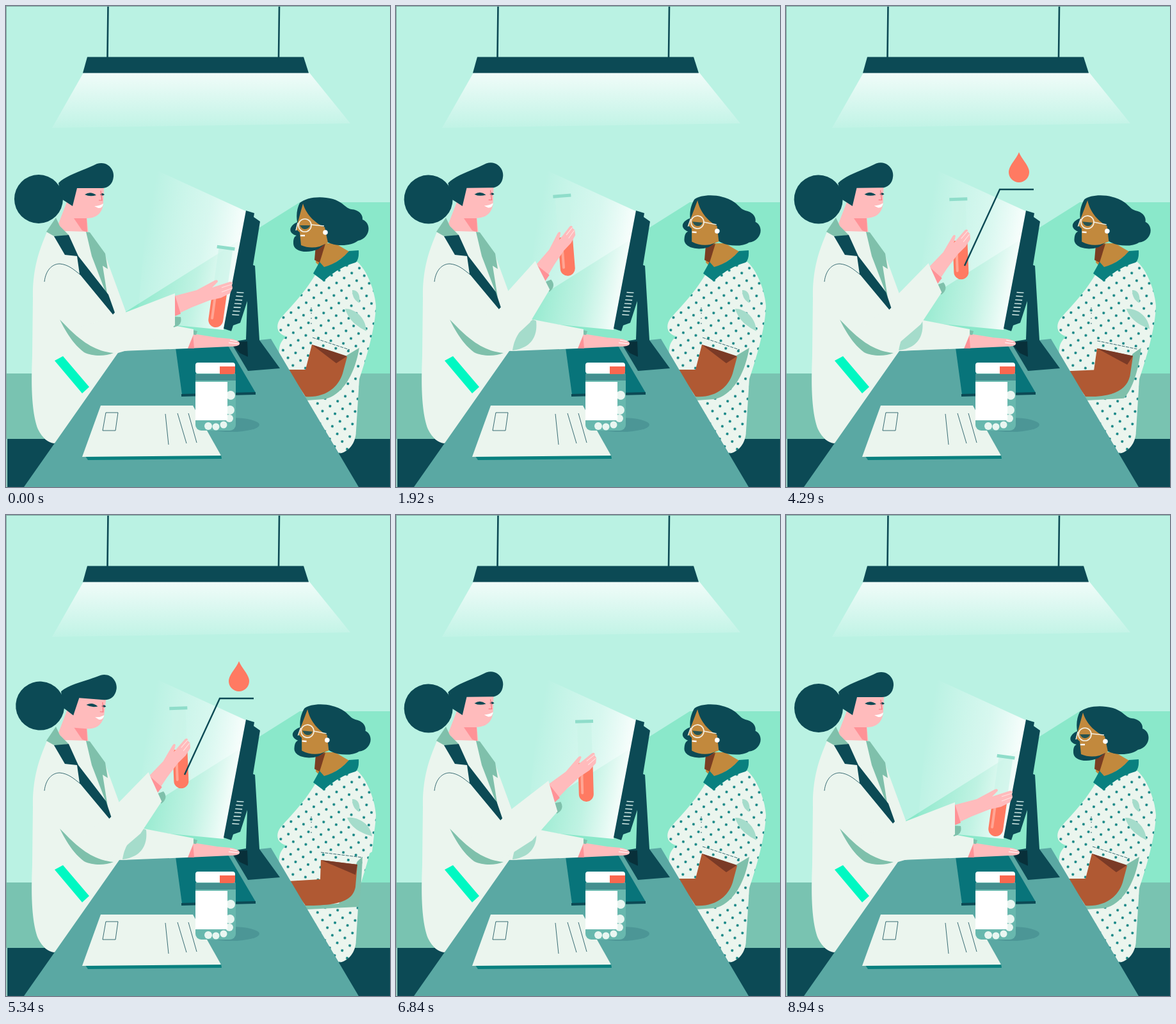
Write an HTML page that moves like this. It is 600 by 750 pixels and loops after 9030 ms.

```html
<!DOCTYPE html>
<html lang="en">
<head>
<meta charset="utf-8">
<title>At the pharmacy desk</title>
<style>
html, body { margin: 0; height: 100%; overflow: hidden; background: #baf2e3; }
svg { display: block; width: 600px; height: 750px; }
.dark { fill: #0c4a55; }
.teal { fill: #09807f; }
.cream { fill: #ebf5ee; }
.shade { fill: #7fc0ab; }
.mint { fill: #a5dccb; }
.skin { fill: #ffbbbc; }
.blush { fill: #ff9297; }
.red { fill: #ff7a62; }
.brown { fill: #c2893d; }
.white { fill: #fff; }
.thin { fill: none; stroke: #0c4a55; stroke-width: .8; }
</style>
</head>
<body>
<svg viewBox="0 0 600 750">
  <defs>
    <linearGradient id="lamp" x2="0" y2="1">
      <stop stop-color="#f1fcf9"/><stop offset="1" stop-color="#f1fcf9" stop-opacity=".12"/>
    </linearGradient>
    <linearGradient id="beam" gradientUnits="userSpaceOnUse" x1="212" y1="375" x2="364" y2="405">
      <stop stop-color="#fff" stop-opacity="0"/><stop offset=".6" stop-color="#f4fdfb" stop-opacity=".5"/>
      <stop offset="1" stop-color="#fff" stop-opacity=".95"/>
    </linearGradient>
    <pattern id="dots" width="20" height="20" patternUnits="userSpaceOnUse" patternTransform="rotate(12)">
      <rect width="20" height="20" class="cream"/>
      <circle cx="5" cy="5" r="2" class="teal"/><circle cx="15" cy="15" r="2" class="teal"/>
    </pattern>
    <clipPath id="aboveLine"><path d="M330 200H400V285H330Z"/></clipPath>
  </defs>

  <!-- Room -->
  <rect width="600" height="750" fill="#baf2e3"/>
  <path d="M459 306H600V573H41V567L190 475Z" fill="#8ae8ca"/>
  <rect y="573" width="600" height="102" fill="#79c3b1"/>
  <rect x="2" y="675" width="598" height="75" class="dark"/>
  <path d="M159.5 0L158.5 80M427 0L426 80" stroke="#0c4a55" stroke-width="2.6"/>
  <path d="M121 104H474L538 183L72 190Z" fill="url(#lamp)"/>
  <path d="M127 79.5H465L473 104.5H120Z" class="dark"/>
  <path d="M226 252L375 320L340 505L205 492Z" fill="url(#beam)"/>

  <!-- Patient -->
  <path d="M487 412C470 445 440 474 429 487C420 499 424 512 438 515C430 522 425 530 427 546L520 698C535 696 547 682 547 662L552 582C560 558 577 505 578 468C577 448 566 414 549 399Z" fill="url(#dots)"/>
  <path d="M541 443C550 442 554 452 552 463C544 459 541 452 541 443Z" class="mint"/>
  <path id="sleeve" fill="url(#dots)"/>
  <path id="fold" class="mint"/>
  <path id="elbow" class="shade"/>
  <path id="forearm" fill="#b05933"/>
  <path id="inside" fill="#7a3a26"/>
  <path id="hem" class="thin" stroke-dasharray="5 1.5"/>
  <path d="M486 370H514L538 384L497 412L484 400Z" class="brown"/>
  <path d="M484 373L499 371L490 400L482 396Z" fill="#7a3d22"/>
  <path d="M490 399L497 407Q520 401 536 382L551 381Q552 396 546 400Q520 407 496 429L480 417Z" class="teal"/>
  <path d="M477 470v32" class="thin" stroke-dasharray="2 6"/>
  <g id="patientHead">
    <path d="M459 307C470 297 502 294 522 306C530 311 533 316 540 317C552 318 558 326 557 333C572 339 569 362 550 366C540 374 517 376 502 368L488 379C470 387 448 383 449 369C449 362 451 359 454 358C440 354 442 343 455 337C453 325 455 315 459 307Z" class="dark"/>
    <path d="M464 308L453 348L459 353L461 373Q475 379 490 375L503 369L498 345C486 340 470 328 464 308Z" class="brown"/>
    <path d="M459 342h16a8 8 0 0 1-13 4Z" class="dark" opacity=".85"/>
    <path d="M460 358L467 358" stroke="#fff" stroke-width="2.4"/>
    <circle cx="467" cy="342" r="10" fill="none" stroke="#f3efe2" stroke-width="1.7"/>
    <path d="M477 341L497 343M456 338L453 350" stroke="#f3efe2" stroke-width="1.4"/>
    <circle cx="499" cy="353" r="3.8" class="white"/>
  </g>

  <!-- Doctor's coat -->
  <path d="M96 303L81 342L100 362L129 358L126 328Z" class="skin"/>
  <path d="M106 331H126L127 353L119 350Z" class="blush"/>
  <path d="M64 352C55 374 41 405 42 455L41 545C39 590 40 635 50 660C57 674 66 681 75 682L95 675L190 537L187 476L154 386L128 352L96 351Z" class="cream"/>

  <!-- Desk -->
  <path d="M177 538L290 532L414 519L551 750H28Z" fill="#5aa8a3"/>
  <path d="M265 533L347 530L390 603L275 606Z" fill="#08747a"/>
  <path d="M274 607L390 604" stroke="#0c4a55" stroke-width="4"/>
  <path d="M375 319L388 323L387 329L397 336L386 404L389 405L396 521L428 565L378 569L351 524L375 520L377 460L366 494L355 498L352 507L340 503Z" class="dark"/>
  <path d="M351 524L377 523L378 547L365 541Z" fill="#08303a"/>
  <path id="vents" stroke="#e4f7f2" stroke-width="1.4"/>
  <path d="M124 702L336 700L337 706L128 708Z" class="teal"/>
  <path d="M148 623H292L336 701L119 703Z" class="cream"/>
  <path d="M156 634H175L171 662H151ZM249 636L254 684M268 635L282 682M285 635L298 681" class="thin"/>
  <ellipse cx="352" cy="653" rx="44" ry="11" fill="#4c9696"/>
  <rect x="296" y="568" width="63" height="94" rx="9" fill="#68b8ae"/>
  <path d="M296 574H359V584H296Z" fill="#438f8f"/>
  <g id="pills" fill="#e9f6f1"></g>
  <rect x="296" y="586" width="50" height="60" class="white"/>
  <rect x="296" y="556" width="62" height="17" rx="4" class="white"/>
  <path d="M334 562H358V570Q358 574 354 574H334Z" fill="#f9674f"/>

  <!-- Doctor's arms -->
  <g id="typing">
    <path d="M284 534L292 511L330 517L352 519Q366 522 365 527Q364 531 350 531Z" class="skin"/>
    <path d="M284 534L292 511L294 534Z" class="blush"/>
    <path d="M350 521L361 523M348 525L364 527" stroke="#fff" stroke-width="1.2"/>
    <path d="M288 504L299 507L297 513L290 512Z" class="shade"/>
    <path d="M150 480L215 489L293 504V512L284 534L180 538Z" class="cream"/>
    <path d="M182 537C185 515 198 498 214 489L219 491C222 518 208 534 182 537Z" class="mint"/>
  </g>
  <g id="arm">
    <path d="M258 484L273 485Q276 498 262 501Z" class="shade"/>
    <g id="hand">
      <g id="tube">
        <path d="M-11-62H11V52A11 11 0 0 1-11 52Z" fill="#c9f4e8" opacity=".65"/>
        <path d="M-11.5 3H11.5V52A11.5 11.5 0 0 1-11.5 52Z" class="red"/>
        <path d="M-6 20V50" stroke="#ffa695" stroke-width="4" stroke-linecap="round"/>
        <path d="M-14-64H14V-59H-14Z" fill="#8fddca"/>
      </g>
      <path d="M260 453L298 443L326 428Q331 426 331 430L322 439L350 430Q356 430 353 435L354 440L350 448L336 455L318 459L290 470L260 484Z" class="skin"/>
      <path d="M260 452L264 451L273 480L260 485Z" class="blush"/>
      <path d="M337 439L353 434M337 446L353 440" stroke="#ffe3e2" stroke-width="1.2"/>
    </g>
    <path d="M160 488L264 448V498L213 530L175 541Q150 546 135 541L115 500Z" class="cream"/>
  </g>
  <path d="M84 489C105 510 130 538 168 541C154 547 134 546 122 540C106 528 95 511 84 489Z" class="shade"/>
  <path d="M76 553L89 546L130 594L119 604Z" fill="#00f8c2"/>
  <path d="M60 430C62 412 72 402 84 402C97 403 106 411 116 419" class="thin"/>
  <path d="M78 330L63 352L77 360L98 357L84 343Z" class="shade"/>
  <path d="M125 352L131 353L155 386L159 410L151 405L159 455L134 390Z" class="shade"/>
  <path id="lapel" class="dark"/>

  <g id="head">
    <circle cx="51" cy="301" r="38" class="dark"/>
    <path d="M107 283H153L152 305C152 320 144 331 126 331H104L100 306Z" class="skin"/>
    <path d="M82 276C95 263 120 257 142 246C158 241 169 254 168 266C167 278 159 284 150 284H111L104 312L87 301Z" class="dark"/>
    <path d="M123 294Q132 288 141 295Q131 298 123 294ZM147 294Q150 290 154 294Q150 297 147 294Z" class="dark"/>
    <path d="M148 288L150 303H145" fill="none" stroke="#f9767f" stroke-width="1.2"/>
    <path d="M138 312Q146 312 152 308Q151 316 144 315Z" class="white"/>
  </g>

  <!-- Callout -->
  <path id="line" d="M279 405L334 286H387" fill="none" stroke="#0c4a55" stroke-width="2.4" pathLength="1" stroke-dasharray="1 2"/>
  <g clip-path="url(#aboveLine)">
    <path id="drop" class="red" d="M364 228C369 240 380 249 380 259A16 16 0 0 1 348 259C348 249 359 240 364 228Z"/>
  </g>
  <path d="M0 .5H600M.5 0V750" stroke="#7da89f"/>
</svg>
<script>
const LOOP = 9030;
const $ = id => document.getElementById(id);
const set = (id, name, value) => $(id).setAttribute(name, value);
const move = (id, value) => set(id, 'transform', value);

// Eased value between [time, value] keys
function key(t, ...keys) {
  if (t <= keys[0][0]) return keys[0][1];
  for (let i = 1; i < keys.length; i++) {
    const [t0, a] = keys[i - 1], [t1, b] = keys[i];
    if (t <= t1) return a + (b - a) * (1 - Math.cos(Math.PI * (t - t0) / (t1 - t0))) / 2;
  }
  return keys[keys.length - 1][1];
}

// Blend two paths with the same commands
function blend(id, from, to, k) {
  const end = to.match(/[\d.]+/g);
  let i = 0;
  set(id, 'd', from.replace(/[\d.]+/g, n => +n + (end[i++] - n) * k));
}

set('vents', 'd', Array.from({length: 7}, (_, i) => `M${360.5 - i * 1.2} ${446.5 + i * 5.8}l11 .6`).join(''));
$('pills').innerHTML = [[351, 607, 7], [350, 630, 7], [349, 643, 6], [340, 653, 5.5], [328, 656, 5.5], [316, 655, 6]]
  .map(([x, y, r]) => `<circle cx="${x}" cy="${y}" r="${r}"/>`).join('');

function draw(t) {
  const nod = key(t, [0, 0], [800, 6.5], [1700, -.7], [4800, -.7], [5600, 6], [6500, -.7], [7500, -.7], [8370, 0]);
  move('head', `rotate(${nod} 97 328)`);

  const lift = key(t, [350, 0], [2000, -27], [2750, -24.5], [6300, -24.5], [7700, 0]);
  const tilt = key(t, [0, 8], [780, 11], [1900, -4.5], [2750, -2.3], [6600, -2.3], [8100, 8]);
  const size = 1 + lift * .004;
  move('arm', `rotate(${lift} 135 520)`);
  move('hand', `translate(266 467) rotate(${lift * .28}) scale(${size}) translate(-266 -467)`);
  move('tube', `translate(335 438) rotate(${tilt - lift * 1.28}) scale(${1 / size})`);
  blend('lapel', 'M75 359L98 357L113 390L160 450L170 478L167 481L115 418L111 390L92 388Z',
    'M75 359L98 357L113 390L156 446L164 470L161 473L115 418L111 390L92 388Z', -lift / 26);
  move('typing', `translate(${key(t, [2300, 0], [3050, -6], [3700, 0], [4350, -6], [5000, 0])})`);

  move('patientHead', `rotate(${key(t, [1000, 0], [1800, 5.3], [7700, 5.3], [8550, 0])} 522 383)`);
  const swing = key(t, [3800, 0], [4700, 1], [5500, 1], [6400, 0]);
  blend('sleeve', 'M500 450L479 517L535 536L552 534L565 510L572 470Z',
    'M500 450L492 526L556 535L572 525L575 500L574 470Z', swing);
  blend('fold', 'M530 472C545 472 562 485 563 507C550 500 536 492 530 472Z',
    'M533 472C548 470 569 480 572 501C556 496 541 490 533 472Z', swing);
  blend('elbow', 'M552 533C545 575 525 608 497 613L470 615L466 606L500 600L532 545Z',
    'M557 533C556 560 554 590 551 611L470 615L466 608L520 606L549 540Z', swing);
  blend('forearm', 'M478 528L533 547L526 573C518 598 495 611 468 609L440 567L468 567Z',
    'M492 538L549 545L546 580C542 602 520 609 468 609L440 571L491 568Z', swing);
  blend('inside', 'M478 528L533 546L516 557Z', 'M492 538L549 545L546 561Z', swing);
  blend('hem', 'M479 517L537 536', 'M492 526L557 534', swing);

  const drawn = key(t, [2300, 0], [2950, 1], [5950, 1], [6450, 0]);
  set('line', 'stroke-dashoffset', 1 - drawn);
  set('line', 'opacity', drawn > .001 ? 1 : 0);
  move('drop', `translate(0 ${key(t, [2800, 60], [3350, -4], [3650, 0], [5500, 0], [6000, 60])})`);
}

function tick() {
  draw(performance.now() % LOOP);
  requestAnimationFrame(tick);
}
tick();
</script>
</body>
</html>
```
